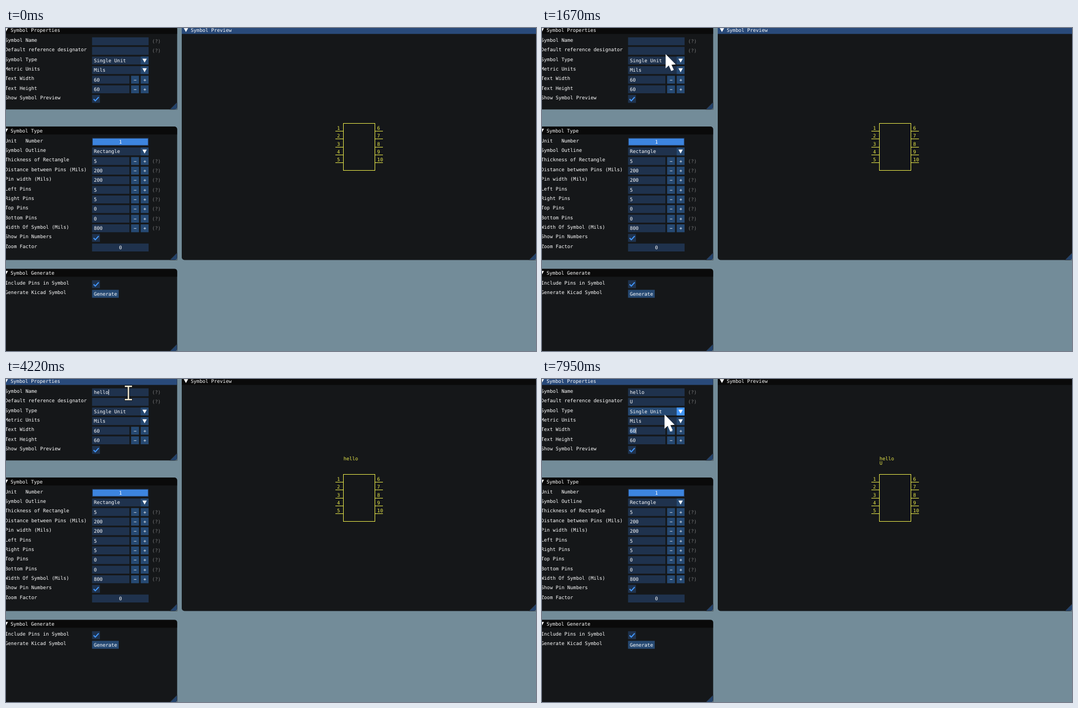
Animation of 959x584 px, one loop 8000 ms. Source, as an HTML page with a canvas:

```html
<!DOCTYPE html>
<html lang="en">
<head>
<meta charset="utf-8">
<title>Symbol editor</title>
<style>
  html, body { margin: 0; width: 100%; height: 100%; overflow: hidden; background: #738c99; }
  canvas { display: block; }
</style>
</head>
<body>
<canvas id="stage" width="959" height="584"></canvas>
<script>
const ctx = document.getElementById('stage').getContext('2d');
const LOOP = 8000;
const CHAR = 5.28, ROW = 17.37, BOX = 14.3;
const LEFT = 155.7, RIGHT = 258, TEXT_X = 158.6;
const COLOR = {
  back: '#738c99', window: '#151719', border: '#33373c', title: '#0a0a0a', active: '#294a7a',
  frame: '#1f324d', button: '#264972', bright: '#4296fa', slider: '#3d85e0', grip: '#23426a',
  selection: '#2b558a', text: '#fff', hint: '#77787a', yellow: '#e8e84a'
};

// Mouse moves: start, end, number of held positions, from, to
const MOVES = [
  [350, 530, 3, [603, 500], [483, 374]],
  [740, 1290, 8, [451, 364], [227, 54]],
  [1670, 2060, 6, [224, 48], [219, 23]],
  [7720, 7950, 4, [219, 30], [222, 65]]
];
const KEY_TIMES = [3450, 3680, 3910, 4060, 4220];
const CLICK = 2210, FOCUS = 2290, RELEASE = 2440;
const FIRST_TAB = 5300, TYPE_U = 6310, SECOND_TAB = 6940;

function rect(x, y, w, h, color) {
  ctx.fillStyle = color;
  ctx.fillRect(x, y, w, h);
}

function text(str, x, middle, color = COLOR.text) {
  ctx.fillStyle = color;
  ctx.fillText(str, x + 0.3, middle + 3.1);
}

function centered(str, x, middle) {
  text(str, x - str.length * CHAR / 2, middle);
}

function polygon(points, color) {
  ctx.beginPath();
  points.forEach(([x, y]) => ctx.lineTo(x, y));
  ctx.closePath();
  ctx.fillStyle = color;
  ctx.fill();
}

function line(points, color, width) {
  ctx.beginPath();
  points.forEach(([x, y]) => ctx.lineTo(x, y));
  ctx.strokeStyle = color;
  ctx.lineWidth = width;
  ctx.stroke();
}

function downArrow(x, y) {
  polygon([[x - 4, y - 3.3], [x + 4, y - 3.3], [x, y + 3.8]], COLOR.text);
}

function panel(x, y, right, bottom, title, active) {
  ctx.save();
  ctx.beginPath();
  ctx.roundRect(x, y, right - x, bottom - y, 5);
  ctx.fillStyle = COLOR.window;
  ctx.fill();
  ctx.save();
  ctx.clip();
  rect(x, y, right - x, BOX, active ? COLOR.active : COLOR.title);
  polygon([[right, bottom - 13], [right, bottom], [right - 13, bottom]], COLOR.grip);
  ctx.restore();
  ctx.strokeStyle = COLOR.border;
  ctx.lineWidth = 0.7;
  ctx.stroke();
  ctx.restore();
  downArrow(x + 7.6, y + 7.1);
  text(title, x + 16, y + 7.4);
}

const widgets = {
  input(y, value) {
    rect(LEFT, y - BOX / 2, RIGHT - LEFT, BOX, COLOR.frame);
    text(value, TEXT_X, y);
  },
  combo(y, value, hovered) {
    rect(LEFT, y - BOX / 2, RIGHT - LEFT, BOX, hovered ? COLOR.button : COLOR.frame);
    rect(RIGHT - BOX, y - BOX / 2, BOX, BOX, hovered ? COLOR.bright : COLOR.button);
    downArrow(250.8, y);
    text(value, TEXT_X, y);
  },
  number(y, value, selected) {
    rect(LEFT, y - BOX / 2, 67.6, BOX, COLOR.frame);
    if (selected) rect(TEXT_X, y - 5.2, value.length * CHAR, 10.4, COLOR.selection);
    text(value, TEXT_X, y);
    [['−', 226.3], ['+', RIGHT - BOX]].forEach(([sign, x]) => {
      rect(x, y - BOX / 2, BOX, BOX, COLOR.button);
      centered(sign, x + BOX / 2, y);
    });
  },
  check(y) {
    rect(LEFT, y - BOX / 2, BOX, BOX, COLOR.frame);
    line([[158.5, y + 0.3], [161.6, y + 3.4], [167.8, y - 3.4]], COLOR.bright, 2);
  },
  slider(y, value, full) {
    rect(LEFT, y - BOX / 2, RIGHT - LEFT, BOX, COLOR.frame);
    if (full) rect(LEFT + 1.2, y - BOX / 2 + 1.2, RIGHT - LEFT - 2.4, BOX - 2.4, COLOR.slider);
    centered(value, 206.9, y);
  },
  button(y, value) {
    rect(LEFT, y - BOX / 2, 48.3, BOX, COLOR.button);
    text(value, TEXT_X, y);
  }
};

// Each row: label, widget, value, state flag, help marker
function form(firstY, rows) {
  rows.forEach(([label, widget, value, flag, help], i) => {
    const y = firstY + i * ROW;
    text(label, -2, y - 2.2);
    widgets[widget](y, value, flag);
    if (help) text('(?)', 264, y, COLOR.hint);
  });
}

function caret(chars, row) {
  const y = 24 + row * ROW;
  rect(TEXT_X + chars * CHAR + 0.4, y - 5, 0.9, 10, COLOR.text);
}

function preview(name, designator) {
  ctx.strokeStyle = COLOR.yellow;
  ctx.lineWidth = 1;
  ctx.strokeRect(610.5, 172.5, 57, 85);
  for (let i = 0; i < 5; i++) {
    const y = Math.floor(186.6 + i * 14.33) + 0.5;
    line([[596, y], [610.5, y]], COLOR.yellow, 1);
    line([[667.5, y], [682, y]], COLOR.yellow, 1);
    text(String(i + 1), 598.6, y - 6, COLOR.yellow);
    text(String(i + 6), 671.3, y - 6, COLOR.yellow);
  }
  text(name, 610.4, 144, COLOR.yellow);
  text(designator, 610.4, 152, COLOR.yellow);
}

function mouseAt(t) {
  const move = MOVES.filter(m => t >= m[0]).pop();
  if (!move) return null;
  const [start, end, count, from, to] = move;
  const step = Math.min(count - 1, Math.floor((t - start) / (end - start) * (count - 1) + 0.03));
  const f = 1 - (1 - step / (count - 1)) ** 1.4;
  return from.map((v, i) => v + (to[i] - v) * f);
}

function drawArrow(x, y) {
  const shape = [[0, -0.8], [0, 25], [5.7, 19.8], [10.2, 29.8], [14.8, 27.8], [10.6, 18.4], [18.2, 17.8]];
  polygon(shape.map(([px, py]) => [x - 0.3 + px, y + py]), '#fff');
}

function drawBeam(x, y) {
  [['#14171c', 4.4, 1], ['#f6efd8', 2.4, 0]].forEach(([color, width, extra]) => {
    line([[x, y - 11.5], [x, y + 12.5]], color, width);
    [y - 11.3, y + 12.7].forEach(end =>
      line([[x - 6.5 - extra, end], [x + 6.5 + extra, end]], color, width));
  });
}

function draw(t) {
  const focused = t >= FOCUS;
  const mouse = mouseAt(t);
  const name = 'hello'.slice(0, KEY_TIMES.filter(k => t >= k).length);
  const designator = t >= TYPE_U ? 'U' : '';
  const comboHovered = t > 7700 && mouse[1] > 51.5;
  const widthSelected = t >= SECOND_TAB;

  rect(0, 0, 959, 584, COLOR.back);
  ctx.font = '8.77px "DejaVu Sans Mono", monospace';
  ctx.textRendering = 'geometricPrecision';

  panel(-8, -3.6, 309.7, 147.2, 'Symbol Properties', focused);
  form(24, [
    ['Symbol Name', 'input', name, false, true],
    ['Default reference designator', 'input', designator, false, true],
    ['Symbol Type', 'combo', 'Single Unit', comboHovered],
    ['Metric Units', 'combo', 'Mils'],
    ['Text Width', 'number', '60', widthSelected],
    ['Text Height', 'number', '60'],
    ['Show Symbol Preview', 'check']
  ]);

  panel(-8, 178.2, 309.7, 419.5, 'Symbol Type', false);
  form(205.8, [
    ['Unit   Number', 'slider', '1', true],
    ['Symbol Outline', 'combo', 'Rectangle'],
    ['Thickness of Rectangle', 'number', '5', false, true],
    ['Distance between Pins (Mils)', 'number', '200', false, true],
    ['Pin width (Mils)', 'number', '200', false, true],
    ['Left Pins', 'number', '5', false, true],
    ['Right Pins', 'number', '5', false, true],
    ['Top Pins', 'number', '0', false, true],
    ['Bottom Pins', 'number', '0', false, true],
    ['Width Of Symbol (Mils)', 'number', '800', false, true],
    ['Show Pin Numbers', 'check'],
    ['Zoom Factor', 'slider', '0', false]
  ]);

  panel(-8, 435.4, 309.7, 584.5, 'Symbol Generate', false);
  form(463.2, [
    ['Include Pins in Symbol', 'check'],
    ['Generate Kicad Symbol', 'button', 'Generate']
  ]);

  panel(318, -3.6, 959.5, 419.5, 'Symbol Preview', !focused);
  preview(name, designator);

  if (widthSelected) caret(2, 4);
  else if (t >= FIRST_TAB) caret(designator.length, 1);
  else if (focused) caret(name.length, 0);

  if (t >= CLICK && t < RELEASE) {
    ctx.beginPath();
    ctx.arc(218.5, 23.5, 18, 0, Math.PI * 2);
    ctx.fillStyle = 'rgba(190, 184, 22, 0.8)';
    ctx.fill();
  }
  if (!mouse) return;
  const overInput = t > 1670 && t < FIRST_TAB && mouse[1] < 31;
  if (overInput) drawBeam(mouse[0] + 2.5, mouse[1] + 1.5);
  else drawArrow(...mouse);
}

const began = performance.now();
function tick() {
  draw((performance.now() - began) % LOOP);
  requestAnimationFrame(tick);
}
tick();
</script>
</body>
</html>
```
